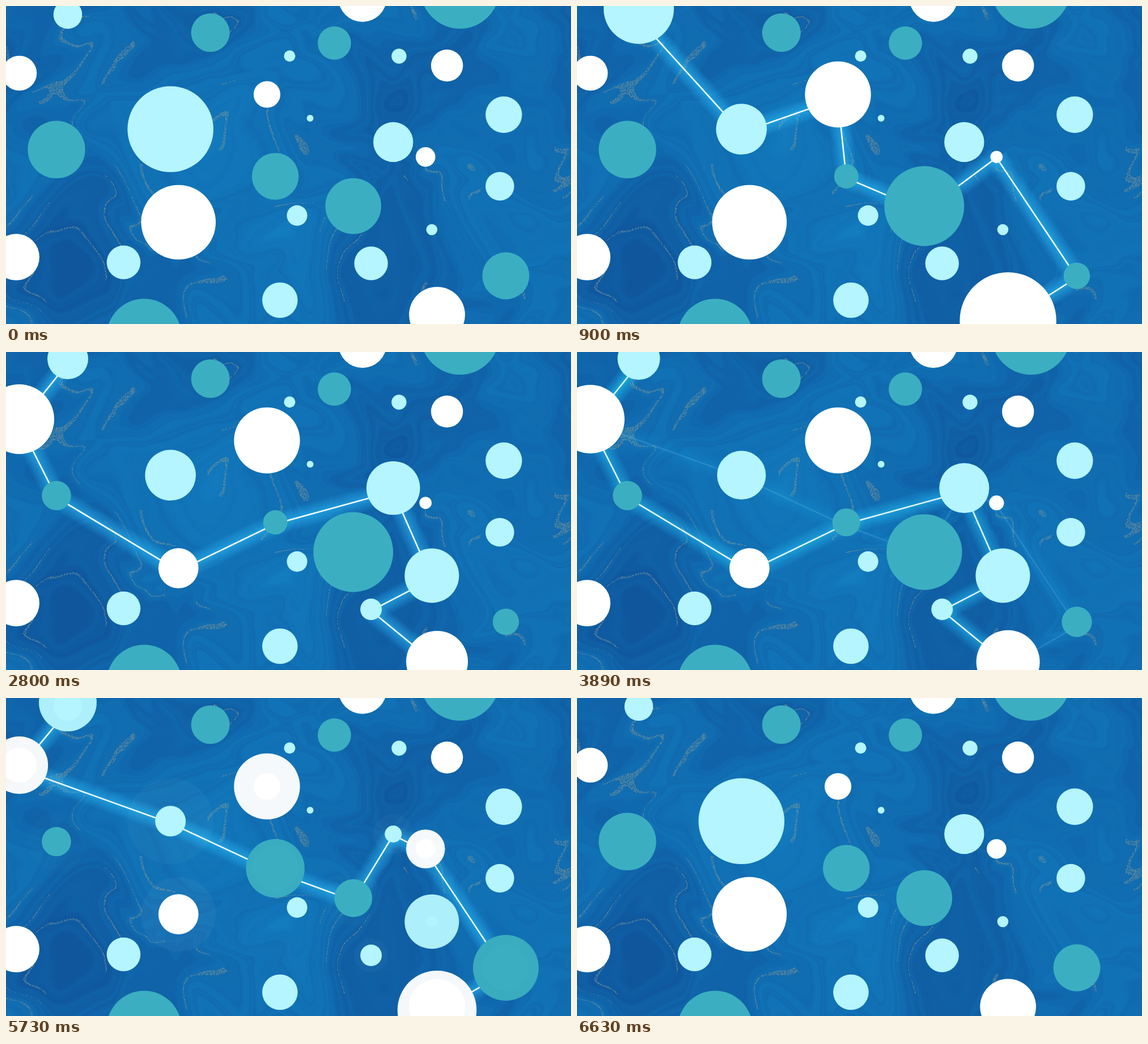
An HTML page with a canvas for the animation above (7600 ms loop, 997 by 561 pixels).

```html
<!DOCTYPE html>
<html lang="en">
<head>
<meta charset="utf-8">
<title>Linked circles</title>
<style>
html, body { margin: 0; width: 100%; height: 100%; overflow: hidden; background: #1068b0; }
canvas { display: block; width: 100vw; height: 100vh; }
</style>
</head>
<body>
<canvas id="stage" width="997" height="561"></canvas>
<script>
const W = 997, H = 561, PHASE = 1900, FADE = 900, STEP = 30;
const INK = { L: '#b4f5ff', W: '#fff', T: '#3bafc1' };
const lerp = (a, b, p) => a + (b - a) * p;

// colour, centre, then the radius in each pose; the last radius given stays
const circles = [
  ['L', 109, 15, 25.3, 62, 36, 51],
  ['W', 23.5, 118.5, 30.8, 30.8, 61.5, 50.7],
  ['T', 89, 253.3, 50.7, 50.7, 25.8],
  ['L', 290.2, 217.3, 75.8, 44.8, 44.8, 27],
  ['W', 304.3, 381.5, 65.8, 65.8, 35.4],
  ['W', 460.5, 156, 23.6, 58.2],
  ['T', 475.2, 300.5, 41.3, 21.5, 21.5, 51.7],
  ['T', 612.8, 353, 49.3, 70.4, 70.4, 33.4],
  ['L', 683.3, 240, 35.2, 35.2, 47.3, 15],
  ['W', 740.3, 266.2, 17.3, 10.8, 10.8, 34.3],
  ['L', 751.4, 394.5, 9.8, 9.8, 48],
  ['L', 644.2, 454, 29.7, 29.7, 19],
  ['T', 882, 476, 41.5, 23.2, 23.2, 58],
  ['W', 760.6, 545, 49.4, 85.2, 54.5, 69.8],
  ['T', 360.7, 47, 34], ['L', 500.5, 88.3, 10], ['T', 579.5, 65.4, 29.4],
  ['W', 629, -14.6, 42.6], ['T', 801, -29.6, 69.6], ['L', 693.5, 88.5, 13.2],
  ['W', 778.2, 105, 28.2], ['L', 536.6, 198, 6], ['L', 878.4, 191.8, 32.2],
  ['L', 871.4, 318, 25.3], ['L', 513.6, 369.6, 18.1], ['L', 483.4, 519, 31.3],
  ['L', 207.5, 452.3, 29.8], ['T', 243.7, 582.6, 66.1], ['W', 18, 443, 41]
].map(([ink, x, y, ...radii]) => ({ ink, x, y, radii }));

const radius = (c, pose) => c.radii[Math.min(pose, c.radii.length - 1)];

// the circles that each pose strings together, by index
const chains = [
  [],
  [0, 3, 5, 6, 7, 9, 12, 13],
  [0, 1, 2, 4, 6, 8, 10, 11, 13],
  [0, 1, 3, 6, 7, 8, 9, 12, 13]
];

// links meet a little below the centres, more so in large circles
const SAG = .13;
const links = chains.map((chain, pose) => {
  const joints = chain.map(i => [circles[i].x, circles[i].y + SAG * radius(circles[i], pose)]);
  return joints.slice(1).map((end, i) => [...joints[i], ...end]);
});

let seed = 11;
const rnd = () => (seed = (seed * 1664525 + 1013904223) >>> 0) / 4294967296;

function makeCanvas() {
  const c = document.createElement('canvas');
  c.width = W;
  c.height = H;
  return c;
}

const lattice = Float32Array.from({ length: 4096 }, rnd);
const ease = t => t * t * (3 - 2 * t);
function noise(x, y) {
  const i = Math.floor(x), j = Math.floor(y), u = ease(x - i), v = ease(y - j);
  const at = (a, b) => lattice[(b & 63) * 64 + (a & 63)];
  return lerp(lerp(at(i, j), at(i + 1, j), u), lerp(at(i, j + 1), at(i + 1, j + 1), u), v) - .5;
}

// light (+) and dark (-) pools of paint: x, y, size, strength
const pools = [
  [400, 200, 110, .32], [480, 430, 80, .4], [870, 390, 90, .25],
  [90, 470, 120, -.36], [660, 150, 60, -.5], [620, 470, 85, -.32]
];

// marbling: bands that follow the level lines of a twice warped height field
function marble() {
  const c = makeCanvas(), g = c.getContext('2d');
  const img = g.createImageData(W, H), d = img.data;
  for (let y = 0, k = 0; y < H; y++) {
    for (let x = 0; x < W; x++, k += 4) {
      const ax = x + 110 * noise(x / 160, y / 160 + 9);
      const ay = y + 110 * noise(x / 160 + 31, y / 160);
      const bx = ax + 45 * noise(ax / 60 + 7, ay / 60);
      const by = ay + 45 * noise(ax / 60, ay / 60 + 23);
      let f = .6 * noise(bx / 130, by / 130) + .2 * noise(bx / 45, by / 45 + 40);
      for (const [px, py, size, s] of pools)
        f += s * Math.exp(-((bx - px) ** 2 + (by - py) ** 2) / size ** 2);

      const bands = .3 * noise(f * 22 + 30, .5) + .22 * noise(f * 60 + 30, 5.5);
      const v = Math.max(0, Math.min(1, .48 + .75 * f + bands));
      const level = Math.abs(f / .24 - Math.round(f / .24));
      const gold = level < .03 && noise(x / 100 + 50, y / 100) > .06 && rnd() < .55 ? .6 : 0;
      d[k] = lerp(lerp(15, 18, v), 125, gold);
      d[k + 1] = lerp(lerp(86, 127, v), 150, gold);
      d[k + 2] = lerp(lerp(157, 193, v), 150, gold);
      d[k + 3] = 255;
    }
  }
  g.putImageData(img, 0, 0);
  return c;
}

const ctx = document.getElementById('stage').getContext('2d');
const paint = marble();
const buffer = makeCanvas(), bufferCtx = buffer.getContext('2d');

function drawLinks(g, list, alpha) {
  if (alpha <= 0) return;
  const stroke = (color, width, a) => {
    g.strokeStyle = color;
    g.lineWidth = width;
    g.globalAlpha = a;
    for (const [x1, y1, x2, y2] of list) {
      g.beginPath();
      g.moveTo(x1, y1);
      g.lineTo(x2, y2);
      g.stroke();
    }
  };
  for (let i = 12; i > 1; i--) stroke('#2fc0f5', 40 * (i / 12) ** 1.5, alpha * .065);
  stroke('#fff', 2.5, alpha);
  g.globalAlpha = 1;
}

function drawCircle(g, c, r) {
  const first = c.radii[0];
  // circles cut by the top or bottom edge grow outwards
  const drift = c.y < first ? -.28 : c.y + first > H ? .28 : 0;
  g.fillStyle = INK[c.ink];
  g.beginPath();
  g.arc(c.x, c.y + drift * (r - first), r, 0, 2 * Math.PI);
  g.fill();
}

function scene(g, from, to, p) {
  g.drawImage(paint, 0, 0);
  drawLinks(g, links[from], 1 - p);
  drawLinks(g, links[to], p);
  for (const c of circles) drawCircle(g, c, lerp(radius(c, from), radius(c, to), p));
}

function render(ms) {
  const t = ms % (4 * PHASE), pose = Math.floor(t / PHASE);
  const p = Math.min(1, Math.floor((t - pose * PHASE) / STEP) * STEP / FADE);
  if (pose < 3) {
    scene(ctx, pose, pose + 1, p);
    return;
  }
  // the last change is a cross-fade instead of a morph
  scene(ctx, 3, 3, 0);
  scene(bufferCtx, 0, 0, 0);
  ctx.globalAlpha = p;
  ctx.drawImage(buffer, 0, 0);
  ctx.globalAlpha = 1;
}

const start = performance.now();
function tick() {
  render(performance.now() - start);
  requestAnimationFrame(tick);
}
tick();
</script>
</body>
</html>
```
